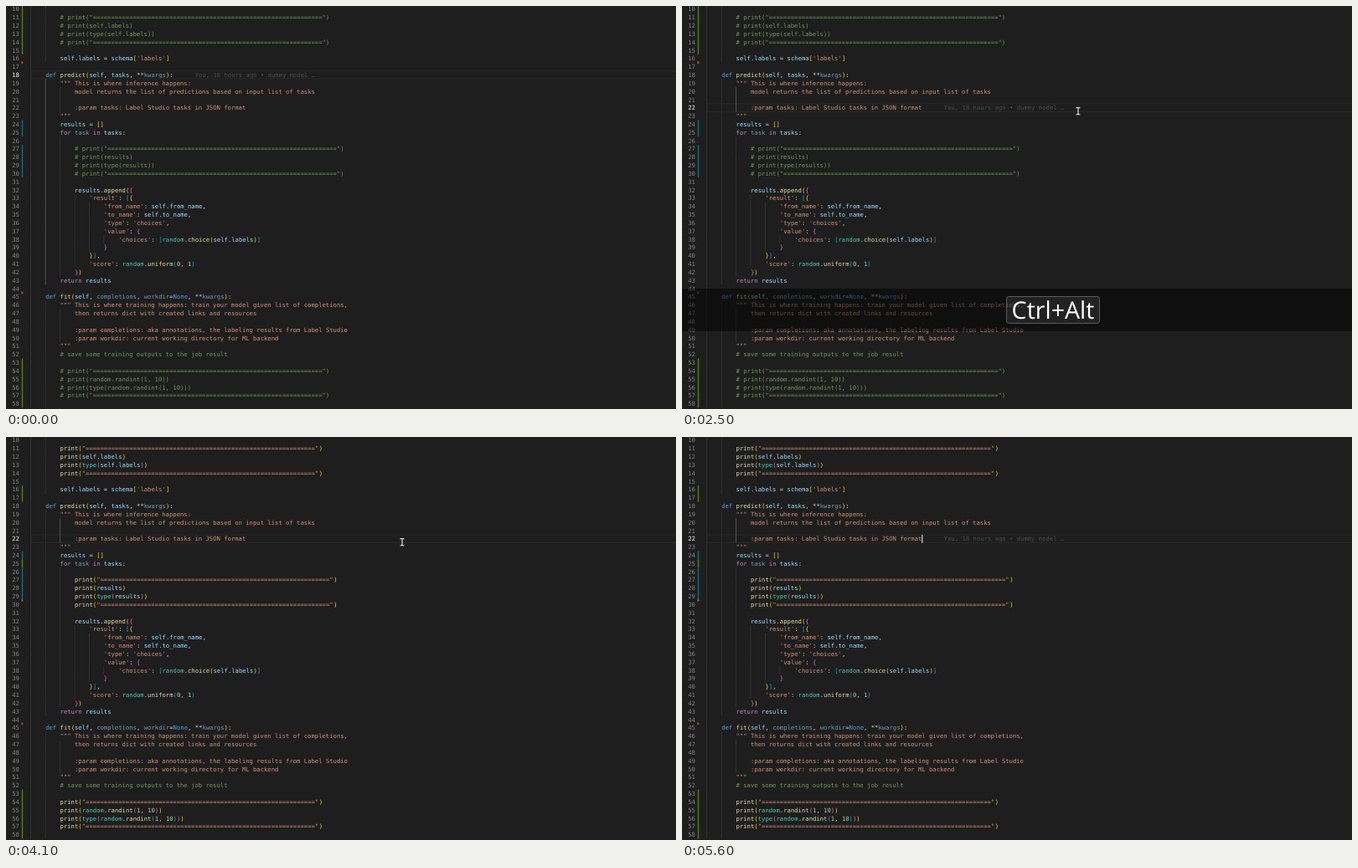
Write an HTML page that moves like this. It is 800 px wide and 482 px high and loops after 5800 ms.

```html
<!DOCTYPE html>
<html lang="en">
<head>
<meta charset="utf-8">
<title>Uncomment log statements</title>
<style>
  html, body { margin: 0; width: 100%; height: 100%; overflow: hidden; background: #1e1e1e; }
  svg { display: block; width: 800px; height: 482px; background: #1e1e1e; }
  text { white-space: pre; text-rendering: geometricPrecision; }
  .code { font: 7.234px "DejaVu Sans Mono", monospace; }
  .key { font: 28.6px "Open Sans", sans-serif; fill: #fff; text-anchor: middle; }
  .title { font: bold 27.7px "Open Sans", sans-serif; fill: #fff; text-anchor: end; }
</style>
</head>
<body>
<svg id="stage" viewBox="0 0 800 482"></svg>
<script>
(() => {
const LOOP = 5800, FIRST = 10, CW = 4.355, LH = 9.83, X0 = 29.75;
const rule = '='.repeat(63);
const code = `
        print("${rule}")
        print(self.labels)
        print(type(self.labels))
        print("${rule}")

        self.labels = schema['labels']

    def predict(self, tasks, **kwargs):
        """ This is where inference happens:
            model returns the list of predictions based on input list of tasks

            :param tasks: Label Studio tasks in JSON format
        """
        results = []
        for task in tasks:

            print("${rule}")
            print(results)
            print(type(results))
            print("${rule}")

            results.append({
                'result': [{
                    'from_name': self.from_name,
                    'to_name': self.to_name,
                    'type': 'choices',
                    'value': {
                        'choices': [random.choice(self.labels)]
                    }
                }],
                'score': random.uniform(0, 1)
            })
        return results

    def fit(self, completions, workdir=None, **kwargs):
        """ This is where training happens: train your model given list of completions,
            then returns dict with created links and resources

            :param completions: aka annotations, the labeling results from Label Studio
            :param workdir: current working directory for ML backend
        """
        # save some training outputs to the job result

        print("${rule}")
        print(random.randint(1, 10))
        print(type(random.randint(1, 10)))
        print("${rule}")
`;
const lines = code.split('\n');

const stage = document.getElementById('stage');
const middle = n => 13.6 + (n - 11) * LH;
const rowTop = n => middle(n) - LH / 2;
const col = c => X0 + c * CW;

function add(parent, tag, attrs = {}, content = '') {
  const el = document.createElementNS('http://www.w3.org/2000/svg', tag);
  for (const key in attrs) el.setAttribute(key, attrs[key]);
  if (content) el.textContent = content;
  parent.append(el);
  return el;
}
const group = (parent = stage) => add(parent, 'g');
const rect = (parent, x, y, width, height, fill, more) =>
  add(parent, 'rect', { x, y, width, height, fill, ...more });
const write = (parent, x, n, fill, str, more) =>
  add(parent, 'text', { class: 'code', x, y: middle(n) + 2.6, fill, ...more }, str);

// Syntax colours
const STRING = '#ce9178', COMMENT = '#6a9955', PLAIN = '#d4d4d4';
const BRACKETS = ['#ffd700', '#da70d6', '#179fff'];
const WORDS = [
  [/^(def|None)$/, '#569cd6'],
  [/^(for|in|return)$/, '#c586c0'],
  [/^(type|random)$/, '#4ec9b0'],
  [/^\d+$/, '#b5cea8']
];
const UNUSED = /^(task|completions|workdir|kwargs)$/;
const TOKEN = /#.*|'[^']*'|"[^"]*"|\w+|[()[\]{}]|[^\s\w()[\]{}'"#]+/g;
let depth = 0, inDoc = false;

function colourOf(token, next) {
  if (token[0] === '#') return COMMENT;
  if (/^['"]/.test(token)) return STRING;
  if (/^[([{]/.test(token)) return BRACKETS[depth++ % 3];
  if (/^[)\]}]/.test(token)) return BRACKETS[--depth % 3];
  if (!/^\w/.test(token)) return PLAIN;
  const word = WORDS.find(([test]) => test.test(token));
  return word ? word[1] : next === '(' ? '#dcdcaa' : '#9cdcfe';
}

function drawLine(parent, n, line) {
  const quotes = line.includes('"""');
  if (inDoc || quotes) {
    const start = line.search(/\S/);
    if (start >= 0) write(parent, col(start), n, STRING, line.trim());
    if (quotes) inDoc = !inDoc;
    return;
  }
  for (const { 0: token, index } of line.matchAll(TOKEN)) {
    const fill = colourOf(token, line[index + token.length]);
    write(parent, col(index), n, fill, token, UNUSED.test(token) ? { 'fill-opacity': .66 } : {});
  }
}

// Parts that come and go: [element, from, to, from, to, ...]
const shows = [];
const during = (el, ...times) => { shows.push([el, ...times]); return el; };

// Current line, its number, guide and blame note
const CLICK = 1700, EDIT = 2700, DIFF = 2900;
const atDef = during(group(), 0, CLICK);
const atDoc = during(group(), CLICK, LOOP);
for (const [g, n] of [[atDef, 18], [atDoc, 22]]) {
  rect(g, 30, rowTop(n) + .2, 775, LH - .6, 'none', { stroke: '#2a2a2a', 'stroke-width': .9 });
}
const blame = (n, end, ...times) =>
  write(during(group(), ...times), col(end + 6), n, '#4b4b4b', 'You, 18 hours ago • dummy model …');
blame(18, 39, 0, CLICK);
blame(22, 59, CLICK, DIFF, 4700, LOOP);

// Indent guides
const indentAt = i => {
  while (i < lines.length && !lines[i].trim()) i++;
  return i < lines.length ? lines[i].search(/\S/) : 8;
};
const guide = (parent, c, from, to, fill) =>
  rect(parent, col(c) - .3, rowTop(from), .6, (to - from + 1) * LH, fill);
lines.forEach((_, i) => {
  for (let c = 0; c < indentAt(i); c += 4) guide(stage, c, FIRST + i, FIRST + i, '#3c3c3c');
});
guide(atDef, 4, 19, 43, '#666');
guide(atDoc, 8, 20, 22, '#666');
stage.append(atDef, atDoc);

// Line numbers and code
const commented = during(group(), 0, EDIT);
const active = during(group(), EDIT, LOOP);
const lineNumber = (parent, n, fill) =>
  write(parent, 15.9, n, fill, String(n), { 'text-anchor': 'end' });
lines.forEach((line, i) => {
  const n = FIRST + i;
  const current = { 18: atDef, 22: atDoc }[n];
  lineNumber(stage, n, '#858585');
  if (current) lineNumber(current, n, '#d0d0d0');
  if (line.trim().startsWith('print(')) {
    drawLine(commented, n, line.replace('print', '# print'));
    drawLine(active, n, line);
  } else drawLine(stage, n, line);
});
stage.append(atDef, atDoc);

// Change marks in the gutter
const GREEN = '#587c0c', TEAL = '#0c6d80';
const before = during(group(), 0, DIFF);
const after = during(group(), DIFF, LOOP);
const bar = (g, from, to, fill) => rect(g, 18.8, rowTop(from), 1.4, (to - from + 1) * LH, fill);
const removed = (g, n) =>
  add(g, 'path', { d: `M18.4 ${rowTop(n) - 2.1}l2.6 2.1l-2.6 2.1z`, fill: '#b04a22' });
bar(before, 10, 15, GREEN);
bar(before, 24, 25, TEAL);
bar(before, 27, 30, TEAL);
removed(before, 17);
bar(after, 16, 17, GREEN);
bar(after, 24, 24, TEAL);
bar(after, 25, 25, GREEN);
bar(after, 26, 29, TEAL);
removed(after, 30);
bar(stage, 53, 58, GREEN);
removed(stage, 45);

// Text cursor and mouse pointer
const caret = (n, c, ...times) =>
  during(rect(stage, col(c) - .5, rowTop(n), 1.2, LH, '#d8d8d8'), ...times);
caret(18, 39, 200, 700, 1200, CLICK);
caret(22, 59, CLICK, 2200, 2800, 3100, 3600, 4100, 4600, 5100, 5600, LOOP);
during(add(stage, 'path', {
  d: 'M470.6 121.6h1.6l.8.6l.8-.6h1.6M473 122v7.4M470.6 129.8h1.6l.8-.6l.8.6h1.6',
  fill: 'none', stroke: '#eee', 'stroke-width': 1.1
}), 900, 4600);

// Keystroke overlay
const overlay = during(group(), 2200, 3400, 4200, 5200);
rect(overlay, 0, 338, 800, 51, '#000', { 'fill-opacity': .5 });
function key(label, x, width, ...times) {
  const g = during(group(overlay), ...times);
  rect(g, x + .5, 347.5, width - 1, 32, '#808080', {
    'fill-opacity': .17, rx: 3, stroke: '#5c5c5c', 'stroke-width': 1
  });
  add(g, 'text', { class: 'key', x: x + width / 2, y: 374 }, label);
  return g;
}
key('Ctrl', 414, 58, 2200, 2400, 4200, 4400);
key('Ctrl+Alt', 387, 112, 2400, 2600);
key('Ctrl+S', 398, 90, 4400, 5200);
const command = key('Ctrl+Alt+U', 658, 149, 2600, 3400);
add(command, 'text', { class: 'title', x: 651, y: 374 }, 'Cue Planter: Uncomment Log Statements');

function frame() {
  const t = performance.now() % LOOP;
  for (const [el, ...times] of shows) {
    const passed = times.filter(time => time <= t).length;
    el.style.display = passed % 2 ? '' : 'none';
  }
  overlay.style.opacity = t < 2300 ? .4 : 1;
  requestAnimationFrame(frame);
}
frame();
})();
</script>
</body>
</html>
```
